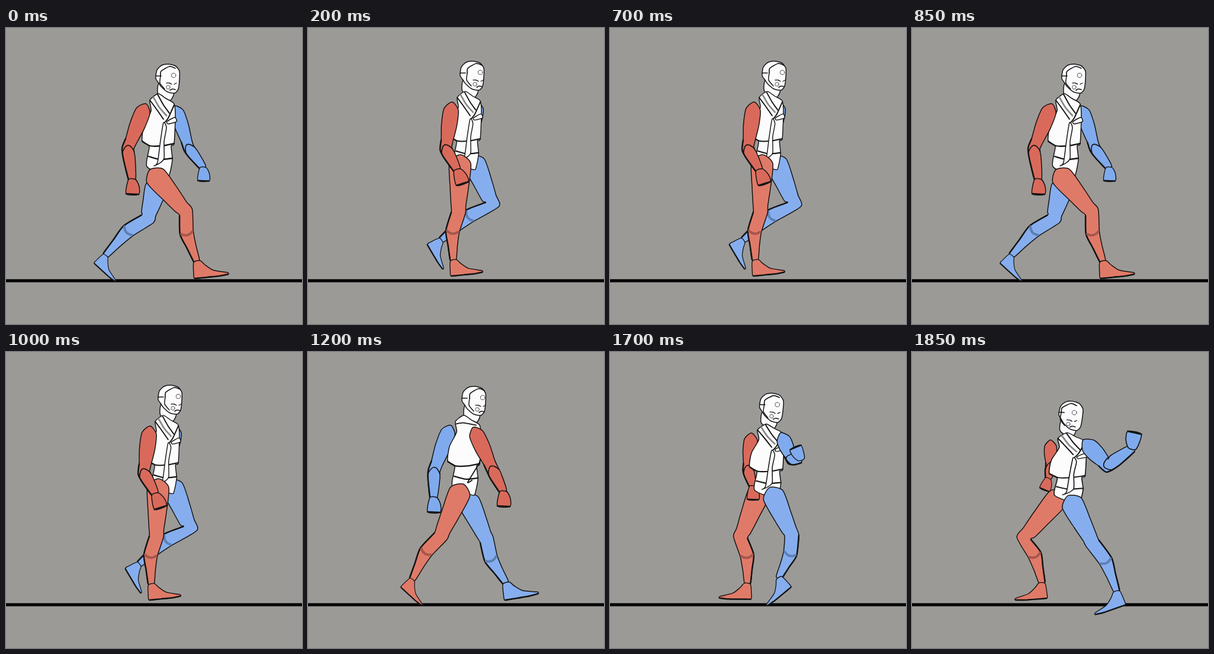
An HTML page that plays this animation: 500 by 500 pixels, repeating every 2.25 s.

```html
<!DOCTYPE html>
<html lang="en">
<head>
<meta charset="utf-8">
<title>Walk cycle</title>
<style>
  html, body { margin: 0; height: 100%; overflow: hidden; background: #9c9a97; }
  svg { display: block; width: 100vw; height: 100vh; stroke-linecap: round; stroke-linejoin: round; }
</style>
</head>
<body>
<svg id="stage" viewBox="0 0 500 500"></svg>
<script>
const INK = '#141414', WHITE = '#fcfcfc';
const PAINT = {
  red: { arm: '#d96a5b', leg: '#e07a68', shade: '#a5564d' },
  blue: { arm: '#7fabee', leg: '#86aeee', shade: '#5d7fb4' }
};

const mix = (a, b, k) => Array.isArray(a) ? a.map((v, i) => mix(v, b[i], k)) : a + (b - a) * k;
const clamp = v => Math.max(0, Math.min(1, v));
const parse = text => text.split(' ').map(s => s.split(',').map(Number));

// Gently rounded path through points
function curve(p, closed) {
  const n = p.length;
  const at = i => closed ? p[(i + n) % n] : p[Math.max(0, Math.min(n - 1, i))];
  let d = 'M' + p[0];
  for (let i = 0; i < (closed ? n : n - 1); i++) {
    const [a, b, c, e] = [at(i - 1), at(i), at(i + 1), at(i + 2)];
    const bend = (o, u, v, k) => o.map((x, j) => (x + (v[j] - u[j]) * k).toFixed(1));
    d += `C${bend(b, a, c, .12)} ${bend(c, b, e, -.12)} ${c}`;
  }
  return d + (closed ? 'Z' : '');
}
const path = (d, fill, w, ink = INK) => `<path d="${d}" fill="${fill}" stroke="${ink}" stroke-width="${w}"/>`;
const shape = (fill, pts, w = 1.5) => path(curve(pts, true), fill, w);
const line = (pts, w = 1.9, ink = INK) => path(curve(pts), 'none', w, ink);
const ring = (x, y, r) => `<circle cx="${x}" cy="${y}" r="${r}" fill="none" stroke="#444" stroke-width=".9"/>`;
const place = (transform, body) => `<g transform="${transform}">${body}</g>`;

// Half widths [u, front, back]; u runs 0..1 on the upper bone and 1..2 on the lower
const LEG = [[0, 18, 18], [.5, 16, 15], [.85, 13, 12], [1, 13, 11], [1.4, 6, 17], [1.7, 5, 11], [2, 5, 5]];
const ARM = [[0, 12, 12], [.4, 13, 13], [.8, 10, 10], [1, 10, 10], [1.3, 10, 10], [2, 6, 6]];
const FOOT = parse('6,-1 14,6 28,15 52,19 53,22 38,25 18,27 -3,29 -5,22 -5,2');
const HAND = parse('-6,0 -10,24 11,25 12,12 6,0');

// Point beside a two-bone limb: `side` to its front, `along` down the bone
function beside(joints, u, side, along = 0) {
  const i = u < 1 ? 0 : 1, p = mix(joints[i], joints[i + 1], u - i);
  const angle = k => Math.atan2(joints[k + 1][1] - joints[k][1], joints[k + 1][0] - joints[k][0]);
  const a = mix(angle(0), angle(1), clamp((u - .85) / .3)), c = Math.cos(a), s = Math.sin(a);
  return [p[0] + s * side + c * along, p[1] - c * side + s * along];
}
function limb(fill, joints, profile, size, face, cap) {
  const front = profile.map(([u, f]) => beside(joints, u, f * size * face));
  const back = profile.map(([u, , b]) => beside(joints, u, -b * size * face)).reverse();
  return shape(fill, [beside(joints, 0, 0, -cap * size), ...front, ...back]) + line(back.slice(0, 4), 2.5);
}
const arc = (joints, u, a, b, along) =>
  `M${beside(joints, u, a)}Q${beside(joints, u, (a + b) / 2, along)} ${beside(joints, u, b)}`;

function leg({ leg: fill, shade }, [hip, knee, ankle, [tilt, size]], face) {
  const joints = [hip, knee, ankle];
  return limb(fill, joints, LEG, 1, face, 14) +
    path(arc(joints, 1.4, 4 * face, -15 * face, 8), 'none', 4, shade) +
    place(`translate(${ankle}) scale(${face * size} ${size}) rotate(${tilt})`,
      shape(fill, FOOT) + line(FOOT.slice(4, 8), 2.6));
}
function arm({ arm: fill }, [shoulder, elbow, wrist, [turn, size]]) {
  const joints = [shoulder, elbow, wrist];
  return limb(fill, joints, ARM, size, 1, 12) +
    path(arc(joints, 1.1, 10 * size, -10 * size, -22), 'none', 1.7) +
    place(`translate(${wrist}) rotate(${turn}) scale(${size})`, shape(fill, HAND) + line(HAND.slice(1, 3), 2.6));
}

const BODY = parse('-21,8 -7,-3 6,5 20,14 22,36 20,81 15,85 17,108 13,130 8,136 -26,120 -22,86 -34,77 -31,51 -19,26');
const SASH = parse('2,46 -3,76 -8,113 -14,119 -4,114 3,106 3,78 7,54');
const POCKET = parse('8,44 21,37 24,44 10,48');
function torso([x, y, sx, sy], back) {
  const lines = (list, w) => list.map(s => line(parse(s), w)).join('');
  const belts = lines(['-34,77 -21,85 0,85 20,81', '-23,103 -4,108 17,106'], 2.3);
  const front = lines(['-21,8 -12,20 2,40', '-8,-2 2,16 12,30', '20,16 10,38 2,48'], 2) +
    line(parse('-15,3 -5,20 7,34'), 2.8, '#888') + shape(WHITE, SASH) + shape(WHITE, POCKET);
  const rear = lines(['-20,12 -8,10 14,14', '22,55 20,78 0,113 7,110'], 1.8);
  return place(`translate(${x} ${y}) scale(${sx} ${sy})`, shape(WHITE, BODY) + belts + (back ? rear : front));
}

const NECK = parse('-14,8 -16,27 3,38 10,24');
const SKULL = parse('-15,8 -20,0 -18,-14 -10,-22 1,-24 13,-21 20,-12 20,2 18,18 12,25 0,23 -11,14');
function head([x, y, look, tilt]) {
  const face = line(parse('-12,-4 -11,-12 3,-20 13,-17'), 1.7) + line(parse('-12,-4 -13,8 -5,18'), 1.5) +
    ring(10, -5, 3.8) + ring(1, 15, 3.2) +
    line(parse('-2,8 3,8 7,10'), 1.3) + line(parse('11,10 15,8'), 1.3) + line(parse('4,20 8,18 13,19'), 1.6);
  return place(`translate(${x} ${y}) rotate(${tilt})`,
    shape(WHITE, NECK) + shape(WHITE, SKULL) + line(parse('-20,-4 -11,-4'), 1.6) + place(`translate(${look})`, face));
}

// Limbs: three joints, then [end rotation, size]
const stride = {
  near: 'red', face: 1, torso: [264, 114, 1, 1], head: [273, 85, 0, 0],
  red: { leg: [[252, 250], [303, 312], [322, 394], [0, 1]], arm: [[232, 139], [206, 204], [213, 256], [0, 1]] },
  blue: { leg: [[254, 268], [238, 322], [168, 384], [48, .8]], arm: [[289, 142], [309, 203], [333, 236], [0, .9]] }
};
const pass = {
  near: 'red', face: 1, torso: [272, 110, .95, .95], head: [277, 80, 4, 0],
  red: { leg: [[257, 228], [253, 312], [245, 392], [0, .93]], arm: [[242, 137], [233, 204], [252, 240], [-20, 1]] },
  blue: { leg: [[281, 228], [310, 298], [225, 358], [65, .85]], arm: [[287, 135], [283, 170], [275, 200], [120, .75]] }
};
const turned = {
  near: 'red', face: 1, back: true, torso: [270, 110, 1, .97], head: [280, 82, 5, 0],
  red: { leg: [[257, 236], [223, 311], [176, 384], [48, .8]], arm: [[284, 138], [312, 199], [330, 236], [0, 1]] },
  blue: { leg: [[271, 252], [301, 318], [334, 390], [-4, 1]], arm: [[237, 135], [213, 201], [212, 246], [0, 1]] }
};
const guard = {
  near: 'blue', face: -1, torso: [270, 139, 1.12, .86], head: [268, 107, -4, 4],
  red: { leg: [[247, 246], [190, 315], [220, 390], [10, .93]], arm: [[234, 158], [234, 195], [230, 214], [20, .8]] },
  blue: { leg: [[270, 255], [306, 323], [346, 404], [25, .93]], arm: [[298, 158], [330, 192], [372, 163], [190, 1.1]] }
};
const moved = (dx, [a, b, c, end]) => [...[a, b, c].map(([x, y]) => [x + dx, y + 2]), end];
const backPass = {
  ...pass, back: true, torso: [271, 108, 1, .97], head: [279, 78, 5, 0],
  red: { leg: moved(12, pass.blue.leg), arm: moved(16, pass.red.arm) },
  blue: { leg: moved(0, pass.red.leg), arm: pass.blue.arm }
};
const halfway = (a, b) => Object.fromEntries(Object.keys(b).map(k =>
  [k, Array.isArray(b[k]) ? mix(a[k], b[k], .5) : typeof b[k] === 'object' ? halfway(a[k], b[k]) : b[k]]));
const settle = halfway(pass, guard);

function figure(pose) {
  const far = pose.near === 'red' ? 'blue' : 'red';
  const limbs = side => leg(PAINT[side], pose[side].leg, pose.face) + arm(PAINT[side], pose[side].arm);
  return limbs(far) + head(pose.head) + torso(pose.torso, pose.back) + limbs(pose.near);
}

const LOOP = 2250;
const cues = [
  [0, stride], [200, pass], [350, turned], [500, backPass], [700, pass], [850, stride],
  [1000, pass], [1200, turned], [1350, backPass], [1500, pass], [1700, settle], [1850, guard]
];
const ground = '<rect y="424.3" width="500" height="5.2" fill="#050505"/>';
const stage = document.getElementById('stage'), start = performance.now();
let shown;
function tick() {
  const t = (performance.now() - start) % LOOP;
  const pose = cues.findLast(([from]) => from <= t)[1];
  if (pose !== shown) stage.innerHTML = ground + figure(shown = pose);
  requestAnimationFrame(tick);
}
tick();
</script>
</body>
</html>
```
